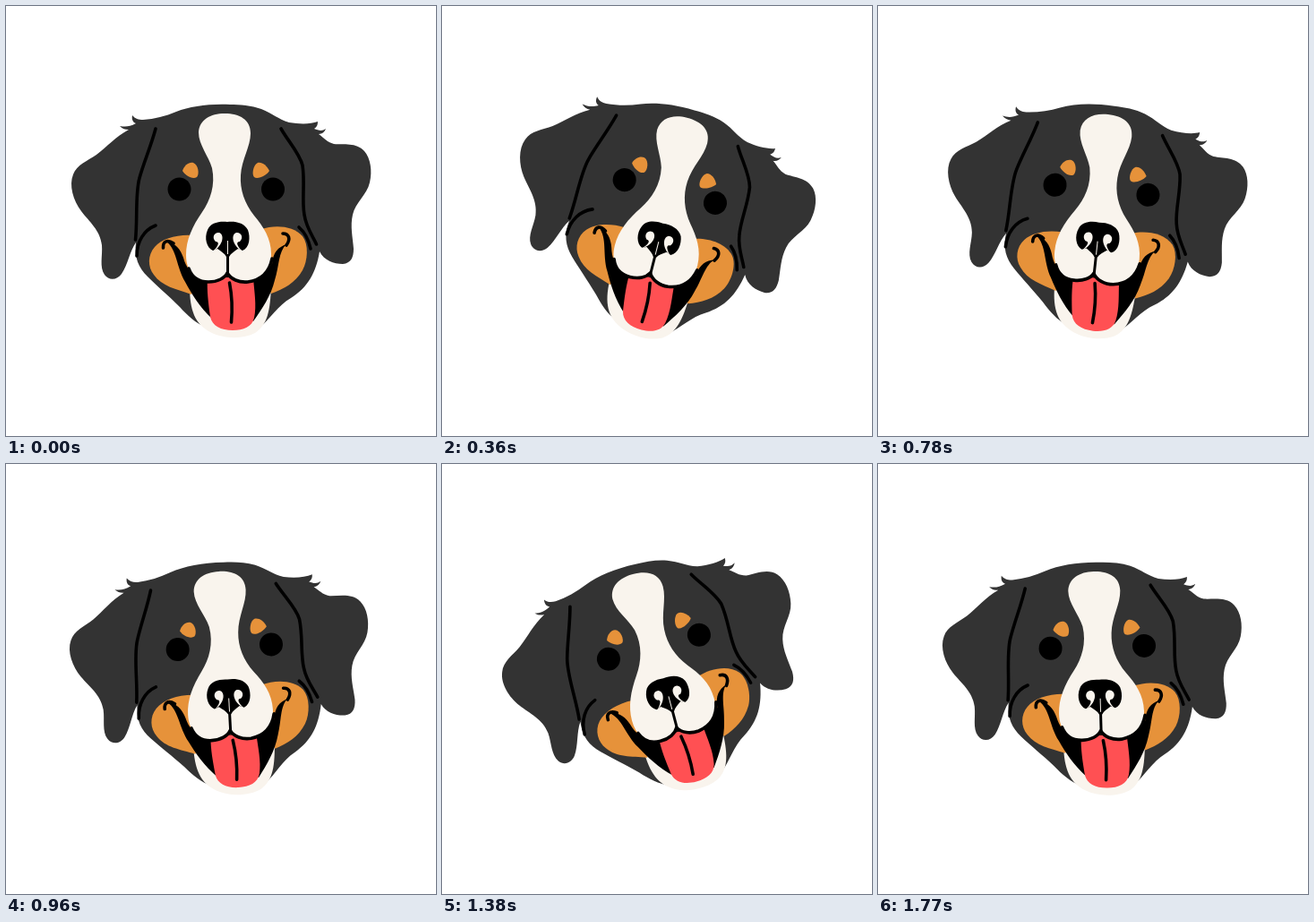
Animation of 480x480 px, one loop 1800 ms. Source, as an HTML page:

```html
<!DOCTYPE html>
<html lang="en">
<head>
<meta charset="utf-8">
<title>Happy dog</title>
<style>
  html, body { margin: 0; width: 100%; height: 100%; overflow: hidden; background: #fff; }
  svg { display: block; width: 100%; height: 100%; }
  .coat { fill: #333; }
  .cream { fill: #f9f4ed; }
  .tan { fill: #e6923a; }
  .tongue { fill: #ff5053; }
  .line { fill: none; stroke: #000; stroke-width: 3.6; stroke-linecap: round; stroke-linejoin: round; }
</style>
</head>
<body>
<svg viewBox="0 0 480 480">
  <g id="head">
    <!-- head and ears -->
    <path class="coat" d="M250 110 C226 109 206 112 190 118 C178 123 166 126 153 127 C148 127 144 126 141 122
      C140 127 142 130 145 131 C138 135 133 135 127 134 C130 137 133 138 137 138 C122 146 113 157 101 166
      C91 173 79 177 75 188 C70 200 75 217 84 229 C93 241 105 250 107 267 C108 279 104 291 110 300
      C115 307 124 306 129 299 C136 289 138 274 145 264 C143 281 148 292 158 302 C169 313 180 322 194 336
      C203 346 212 354 222 358 L284 358 C294 350 304 334 318 326 C337 314 346 298 350 274
      C355 284 366 288 376 288 C385 287 388 281 388 271 C387 258 384 246 387 233 C390 219 403 211 406 197
      C409 184 407 170 400 162 C391 152 377 155 366 154 C358 152 355 147 349 143 C353 143 356 140 357 137
      C353 140 349 139 344 137 C347 135 348 133 348 129 C340 132 328 132 316 130 C303 126 298 120 285 115
      C274 111 261 110 250 110Z"/>

    <!-- chin and cheeks -->
    <path class="cream" d="M205 312 C205 340 211 355 228 364 C243 372 265 372 278 365 C292 356 295 340 296 312Z"/>
    <path class="tan" d="M208 256 C190 255 174 260 166 269 C158 278 158 291 165 300 C174 313 190 316 207 322 L218 290Z"/>
    <path class="tan" d="M285 249 C300 244 321 245 331 257 C338 266 337 284 331 295 C323 309 310 316 296 321 L280 290Z"/>

    <!-- mouth -->
    <path d="M179 263 C189 264 195 272 198 281 C201 292 206 298 213 300 L278 304 L297 288 C298 275 304 269 313 266
      C304 274 305 290 300 306 C296 323 286 338 276 352 L230 349 C216 336 207 321 200 308
      C190 291 191 272 179 263Z"/>
    <path class="tongue" d="M225 303 L276 303 C277 319 280 334 277 348 C275 358 265 362 253 362
      C240 362 230 357 228 347 C226 332 224 318 225 303Z"/>
    <path class="line" d="M249.500 309 C252 322 253 337 251.500 353"/>

    <!-- blaze and muzzle -->
    <path class="cream" d="M244 120 C228 120 216 127 215 141 C215 155 226 167 230 181 C234 200 228 217 219 230
      C208 246 201 261 201 278 C201 297 212 307 226 307 C236 307 244 303 247 297 C251 304 260 308 270 307
      C287 305 296 293 296 277 C296 259 287 246 277 234 C266 220 261 205 262 189 C263 171 273 157 273 142
      C273 127 261 120 244 120Z"/>
    <path class="line" d="M204 293 C208 304 216 308 226 308 C236 308 244 304 247 298 C251 305 260 309 270 308
      C284 306 294 297 297 282"/>
    <path class="line" d="M175.500 270 C175 263 180 260 187 265 M309 254 C316 254 318 260 313 267"/>

    <!-- nose -->
    <path d="M247 241 C238 240 228 242 225 250 C221 259 224 270 231 273 L236 271 C240 274 244 276 246 280
      L246 300 L249 300 L249 280 C251 276 255 274 259 271 L264 273 C272 270 273 258 270 250 C266 242 256 240 247 241Z"/>
    <path class="cream" id="nostril" d="M234 263 C229 258 233 252 238 253 C244 255 243 267 231 274
      C237 268 239 263 234 263Z"/>
    <use href="#nostril" transform="translate(495) scale(-1 1)"/>
    <path d="M247.500 262 V277" stroke="#f9f4ed" stroke-width="1"/>

    <!-- eyes and brows -->
    <circle cx="193.500" cy="204.500" r="13"/>
    <circle cx="298" cy="204.500" r="13"/>
    <path class="tan" d="M197 184 C199 178 204 174 209 175 C215 177 216 188 213 191 C208 194 200 189 197 184Z"/>
    <path class="tan" d="M294 184 C291 178 286 174 281 175 C276 177 274 188 277 191 C281 194 291 189 294 184Z"/>

    <!-- ear and cheek lines -->
    <path class="line" d="M167 137 C162 156 154 174 149 192 C144 210 147 238 144.500 261 M167 245 C154 250 146 263 146 279"/>
    <path class="line" d="M307 137 C315 151 328 165 331 178 C334 198 330 216 333 233 C335 247 342 256 346.500 266
      M327 247 C334 253 338 262 340 271"/>
  </g>
</svg>
<script>
  const LOOP = 1800, STEP = 30, SWING = 15;
  const head = document.getElementById('head');
  const start = performance.now();

  function draw(ms) {
    const t = Math.floor((ms % LOOP) / STEP) * STEP;
    const angle = SWING * Math.sin(2 * Math.PI * t / LOOP);
    head.setAttribute('transform', `rotate(${angle.toFixed(3)} 240 240)`);
  }

  function tick(now) {
    draw(Math.max(0, now - start));
    requestAnimationFrame(tick);
  }

  draw(0);
  requestAnimationFrame(tick);
</script>
</body>
</html>
```
